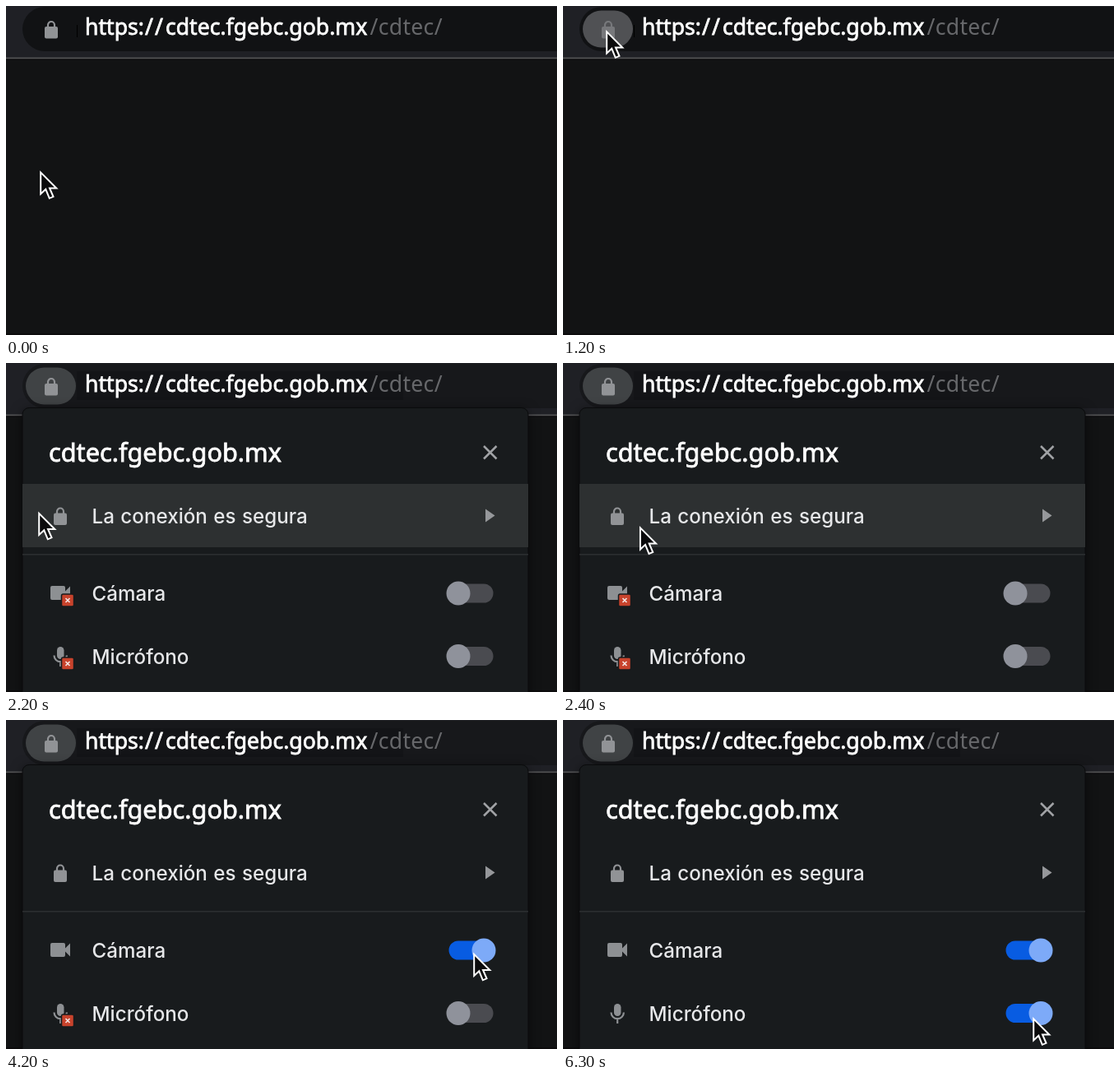
An HTML page that plays this animation: 670 px wide and 400 px high, repeating every 6400 ms.

```html
<!DOCTYPE html>
<html lang="es">
<head>
<meta charset="utf-8">
<style>
  html, body { margin: 0; width: 100%; height: 100%; overflow: hidden; background: #121314; }
  svg { display: block; }
  .url { font-family: "Noto Sans", sans-serif; font-size: 26.6px; }
  .title { font-family: "Noto Sans", sans-serif; font-size: 30.7px; }
  .strong { fill: #fff; stroke: #fff; stroke-width: .8px; }
  .label { font: 500 24.2px Inter, sans-serif; word-spacing: 1px; fill: #e6e7e9; }
</style>
</head>
<body>
<svg width="670" height="400" viewBox="0 0 670 400">
  <defs>
    <g id="lock">
      <rect y="7" width="16" height="14.5" rx="2"/>
      <path d="M4 8V5a4 4 0 0 1 8 0V8" fill="none" stroke="#919396" stroke-width="2.2"/>
    </g>
    <g id="badge">
      <rect width="15" height="15" rx="2" fill="#c8432c" stroke="#181b1d" stroke-width="1.5"/>
      <path d="M5 5l5 5m0-5l-5 5" stroke="#f4e4e0" stroke-width="1.7"/>
    </g>
    <filter id="shadow" x="-10%" y="-10%" width="120%" height="120%" color-interpolation-filters="sRGB">
      <feDropShadow dx="0" dy="3" stdDeviation="7" flood-color="#000" flood-opacity=".5"/>
    </filter>
  </defs>

  <rect width="670" height="63" fill="#1f2025"/>
  <rect y="62.5" width="670" height="2" fill="#525254"/>
  <rect y="64.5" width="670" height="1" fill="#0b0b0c"/>
  <rect y="398" width="670" height="2" fill="#0c0c0d"/>
  <rect id="bar" x="20" y="1" width="700" height="54" rx="27"/>
  <rect id="strip" x="86" y="10" width="397" height="35" fill="#131417"/>
  <rect id="tick" x="86" y="23" width="1" height="15" fill="#000"/>
  <rect id="pill" x="24" y="5.500" width="61" height="45" rx="22.500"/>
  <use id="siteLock" href="#lock" x="47" y="18" fill="#919396"/>
  <g class="url strong">
    <text x="96" y="35">https:</text>
    <text x="169" y="35" letter-spacing="2">//</text>
    <text x="194" y="35">cdtec.fgebc.gob.mx</text>
  </g>
  <text class="url" x="442.500" y="35" letter-spacing=".3" fill="#67686b">/cdtec/</text>

  <g id="panel">
    <rect x="20" y="54.500" width="615" height="380" rx="8" fill="#181b1d" stroke="#0a0b0c" filter="url(#shadow)"/>
    <rect id="row" x="20" y="147" width="615" height="77" fill="#2d3031"/>
    <rect x="20" y="232" width="615" height="1.600" fill="#2b2e30"/>
    <text class="title strong" x="52" y="119.500">cdtec.fgebc.gob.mx</text>
    <path d="M581 101l15.500 15.500m0-15.500l-15.500 15.500" stroke="#a0a2a5" stroke-width="2.500"/>
    <path d="M583 177.500l11.500 8-11.500 8z" fill="#96989b"/>
    <use href="#lock" x="58" y="175.500" fill="#919396"/>
    <text class="label" x="104.500" y="195">La conexión es segura</text>
    <text class="label" x="104.500" y="289">Cámara</text>
    <text class="label" x="104.500" y="366">Micrófono</text>
    <path d="M56 271h14q2 0 2 2v4.500l6-6v16l-6-6v4.500q0 2-2 2h-14q-2 0-2-2v-13q0-2 2-2z" fill="#8d9093"/>
    <rect x="62" y="345" width="8.500" height="15" rx="4.250" fill="#8d9093"/>
    <path d="M58.500 355.500a7.700 7.700 0 0 0 15.400 0M66.200 363v6" fill="none" stroke="#8d9093" stroke-width="2.200"/>
    <g id="switches"></g>
  </g>
  <path id="cursor" d="M1.200 1.800V28L7.300 22.300L11.800 33.300L16.500 31.300L12 21H20.300Z" fill="#0b0b0c" stroke="#fff" stroke-width="2"/>
</svg>
<script>
const LOOP = 6400, STEP = 100;
const HOVER = 800, PRESS = 1200, OPEN = 1500, RELEASE = 1600;
const $ = id => document.getElementById(id);

// time, x, y of the pointer tip
const path = [
  [0, 41, 200.5], [600, 48, 58], [1000, 52, 29.5], [OPEN, 52, 29.5],
  [2200, 39, 181], [2300, 39, 181], [2800, 556, 350], [3000, 567, 320.5],
  [3400, 568, 283], [4600, 568, 283], [5200, 571, 361.5], [LOOP, 571, 361.5]
];
const switches = [
  { y: 280, badgeY: 281, click: 3800 },
  { y: 356.5, badgeY: 358, click: 5700 }
];

const clamp = v => Math.max(0, Math.min(1, v));
const mix = (a, b, k) => a + (b - a) * k;
const blend = (a, b, k) => `rgb(${a.map((v, i) => Math.round(mix(v, b[i], k)))})`;
const show = (el, on) => el.setAttribute("visibility", on ? "inherit" : "hidden");

for (const s of switches) {
  const g = document.createElementNS("http://www.w3.org/2000/svg", "g");
  g.innerHTML = `<rect x="538.5" y="${s.y - 11.5}" width="54" height="23" rx="11.5"/>
    <circle cy="${s.y}" r="14.5"/><use href="#badge" x="67.5" y="${s.badgeY}"/>`;
  $("switches").append(g);
  [s.track, s.knob, s.badge] = g.children;
}

function pointerAt(t) {
  const i = path.findIndex(p => p[0] > t);
  const [t0, x0, y0] = path[i - 1], [t1, x1, y1] = path[i];
  const u = (t - t0) / (t1 - t0), k = u * u * (3 - 2 * u);
  return [mix(x0, x1, k), mix(y0, y1, k)];
}

function pillColor(t) {
  if (t < HOVER) return "none";
  if (t < PRESS) return "#2b2c2f";
  return t < RELEASE ? "#505154" : "#404345";
}

function draw(t) {
  const [x, y] = pointerAt(t), open = t >= OPEN, released = t >= RELEASE;
  $("cursor").setAttribute("transform", `translate(${x} ${y})`);
  $("bar").setAttribute("fill", released ? "#17181b" : "#111214");
  $("pill").setAttribute("fill", pillColor(t));
  $("siteLock").setAttribute("opacity", t >= PRESS && !released ? .6 : 1);
  show($("strip"), released);
  show($("tick"), !open);
  show($("panel"), open);
  show($("row"), open && y > 147 && y < 224);
  for (const s of switches) {
    const k = clamp((t - s.click) / 200);
    s.track.setAttribute("fill", blend([74, 75, 80], [8, 92, 226], k));
    s.knob.setAttribute("fill", blend([143, 146, 155], [125, 170, 248], k));
    s.knob.setAttribute("cx", mix(550, 581, k));
    show(s.badge, t < s.click);
  }
}

function frame() {
  const t = performance.now() % LOOP;
  draw(Math.floor(t / STEP) * STEP);
  requestAnimationFrame(frame);
}
frame();
</script>
</body>
</html>
```
